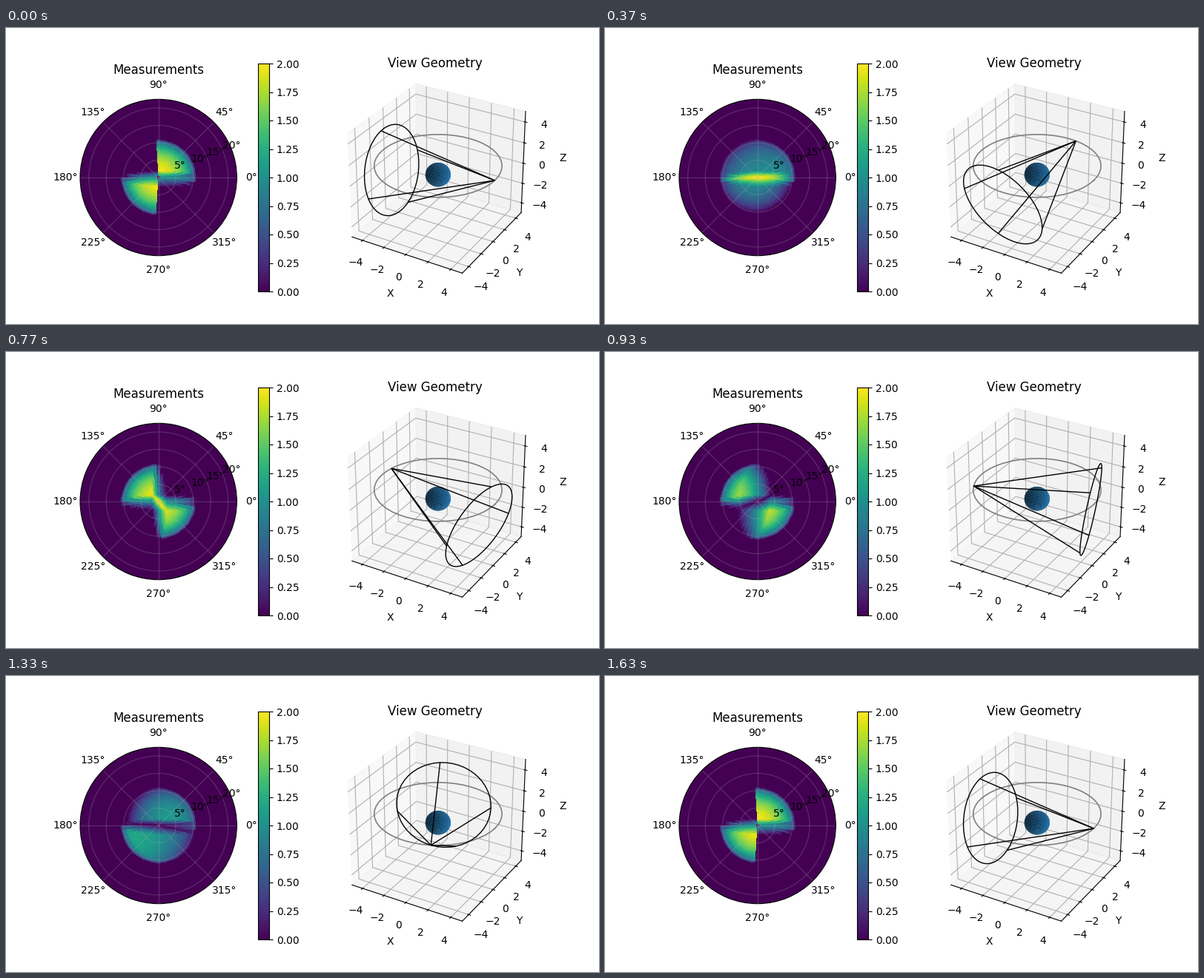
A matplotlib script for the animation above (1660 ms loop, 800x400 px).

```python
import numpy as np
import matplotlib.pyplot as plt
from matplotlib.animation import FuncAnimation
from mpl_toolkits.mplot3d.art3d import Line3DCollection

FRAMES = 50
LOOP_MS = 1660
N = 50                       # rays per circle and circles per cone
FOV = 45                     # full cone angle in degrees
HALF = np.radians(FOV / 2)
ORBIT, HEIGHT = 5, 1

angles = np.linspace(0, 2 * np.pi, N)
spread = np.linspace(0, 1, N) * np.tan(HALF)


def camera(i):
    """Position, view direction, right and up vectors on the orbit."""
    w = 2 * np.pi * i / (FRAMES - 1)
    pos = np.array([ORBIT * np.cos(w), ORBIT * np.sin(w), HEIGHT])
    look = -pos / np.linalg.norm(pos)
    right = np.array([-np.sin(w), np.cos(w), 0])
    return pos, look, right, np.cross(right, look)


def around(right, up):
    return np.outer(np.cos(angles), right) + np.outer(np.sin(angles), up)


def measure(i):
    """Path length of each ray through the parts of the unit ball with yz > 0."""
    pos, look, right, up = camera(i)
    rays = look + spread[:, None, None] * around(right, up)
    rays /= np.linalg.norm(rays, axis=-1, keepdims=True)
    mid = -rays @ pos
    half = np.sqrt(np.maximum(0, 1 - pos @ pos + mid**2))
    near, far = mid - half, mid + half

    # Cut the chord where it crosses the planes y = 0 and z = 0.
    with np.errstate(divide="ignore", invalid="ignore"):
        cuts = [np.nan_to_num(-pos[k] / rays[..., k]) for k in (1, 2)]
    cuts = np.sort([np.clip(c, near, far) for c in cuts], axis=0)
    stops = [near, *cuts, far]
    total = np.zeros_like(near)
    for a, b in zip(stops, stops[1:]):
        t = (a + b) / 2
        y, z = (pos[k] + t * rays[..., k] for k in (1, 2))
        total += np.where(y * z > 0, b - a, 0)
    return total


def wireframe(i):
    """Rim of the view cone and four edges from its tip."""
    pos, look, right, up = camera(i)
    length = 2 * np.linalg.norm(pos)
    rim = (pos + length * np.cos(HALF) * look
           + length * np.sin(HALF) * around(right, up))
    edges = [np.linspace(pos, p, N) for p in rim[::13]]
    return np.array([rim, *edges])


fig = plt.figure(figsize=(8, 4), dpi=100)

# Measured image
polar = fig.add_subplot(1, 2, 1, projection="polar")
mesh = polar.pcolormesh(np.linspace(0, 2 * np.pi, N + 1),
                        np.linspace(0, FOV / 2, N + 1),
                        measure(0), vmin=0, vmax=2, cmap="viridis")
polar.set_rlim(0, FOV / 2)
polar.set_rticks([5, 10, 15, 20])
polar.yaxis.set_major_formatter(lambda r, _: f"{r:.0f}°")
polar.grid(alpha=0.25)
polar.set_title("Measurements")
fig.colorbar(mesh, ax=polar, pad=0.1)

# Camera, orbit and ball
space = fig.add_subplot(1, 2, 2, projection="3d")
space.set_title("View Geometry")
space.plot(ORBIT * np.cos(angles), ORBIT * np.sin(angles),
           np.full(N, HEIGHT), color="gray", lw=1.2)
u, v = np.meshgrid(np.linspace(0, 2 * np.pi, 40), np.linspace(0, np.pi, 40))
space.plot_surface(np.cos(u) * np.sin(v), np.sin(u) * np.sin(v), np.cos(v),
                   color="C0")
cone = Line3DCollection(wireframe(0), colors="black", linewidths=1)
space.add_collection3d(cone)
space.set(xlim=(-5, 5), ylim=(-5, 5), zlim=(-5, 5),
          xlabel="X", ylabel="Y", zlabel="Z")
space.set_box_aspect((1, 1, 0.932))


def update(i):
    mesh.set_array(measure(i))
    cone.set_segments(wireframe(i))
    return mesh, cone


anim = FuncAnimation(fig, update, frames=FRAMES, interval=LOOP_MS / FRAMES,
                     init_func=lambda: update(0), repeat=True, repeat_delay=0)
plt.show()
```
